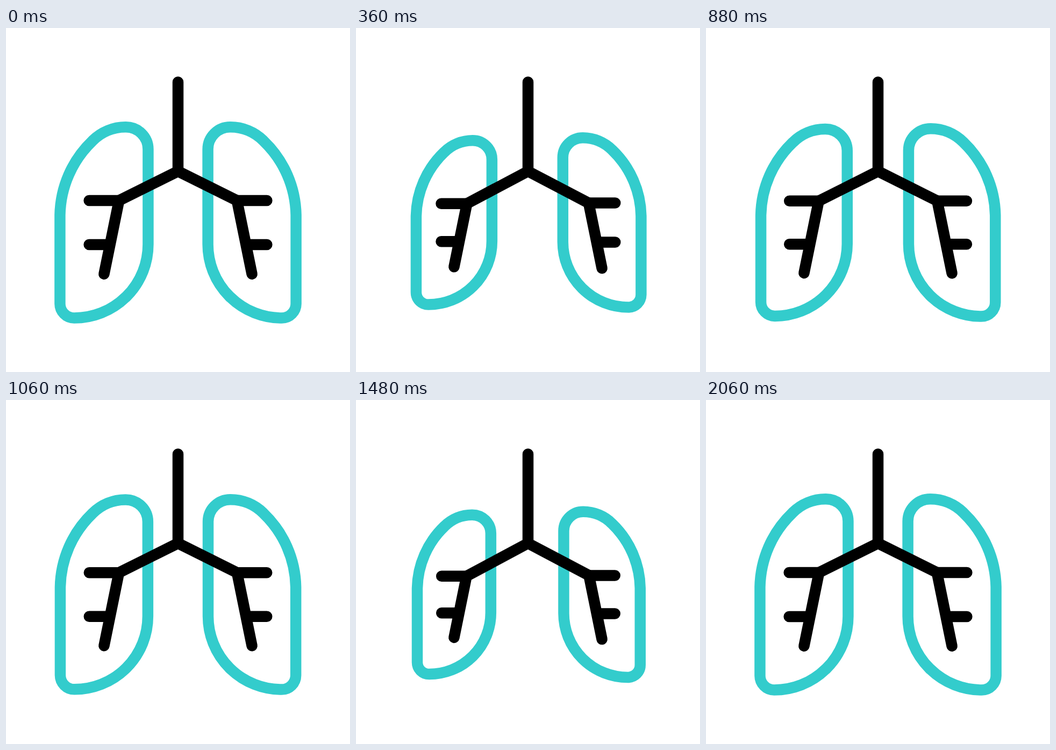
An HTML page that plays this animation: 640x640 px, repeating every 2400 ms.

```html
<!DOCTYPE html>
<html lang="en">
<head>
<meta charset="utf-8">
<title>Breathing lungs</title>
<style>
  html, body { margin: 0; width: 100%; height: 100%; overflow: hidden; background: #fff; }
  svg { display: block; width: 100%; height: 100%; }
  path { fill: none; stroke-linecap: round; stroke-linejoin: round; }
  .lung { stroke: #33cccc; }
  .airway { stroke: #000; }
</style>
</head>
<body>
<svg viewBox="0 0 640 640">
  <defs>
    <path id="lung" d="M100.4 348V513A26.5 26.5 0 0 0 127 539.5A137.4 137 0 0 0 264.4 402.5V225.5A41.5 41.2 0 0 0 222.5 184.3A87 87 0 0 0 161 209.8A196 196 0 0 0 100.4 348Z"/>
    <path id="twigs" d="M154.6 321H210.3L182.4 457.8M154.6 403H193.5"/>
  </defs>
  <g class="lung"><use href="#lung"/></g>
  <g class="lung"><use href="#lung"/></g>
  <g class="airway"><use href="#twigs"/></g>
  <g class="airway"><use href="#twigs"/></g>
  <path class="airway" id="trachea" stroke-width="20.5"/>
</svg>
<script>
  const LOOP = 2400, TICK = 20, WEIGHT = 20.5;
  const CX = 182.4, CY = 361.9;
  const FORK = { x: 210.3, y: 321 };
  // [time in ms, how much the left lung shrinks]
  const KEYS = [[0, 0], [461, 0.16], [1000, 0], [1508, 0.167], [2062, 0], [LOOP, 0]];
  const RIGHT_SHARE = 0.8;

  const [lungL, lungR] = document.querySelectorAll('g.lung');
  const [twigsL, twigsR] = document.querySelectorAll('g.airway');
  const trachea = document.getElementById('trachea');

  const ease = u => u * u * (3 - 2 * u);

  function shrinkAt(t) {
    const i = KEYS.findIndex(k => k[0] > t);
    const [t0, a] = KEYS[i - 1], [t1, b] = KEYS[i];
    return a + (b - a) * ease((t - t0) / (t1 - t0));
  }

  // Scale about the lung's centre while the line weight stays constant.
  function pose(group, scale, mirrored) {
    const flip = mirrored ? 'translate(640 0) scale(-1 1) ' : '';
    group.setAttribute('transform',
      `${flip}translate(${CX} ${CY}) scale(${scale}) translate(${-CX} ${-CY})`);
    group.setAttribute('stroke-width', WEIGHT / scale);
  }

  const forkAt = s => ({ x: CX + (FORK.x - CX) * s, y: CY + (FORK.y - CY) * s });

  function draw(now) {
    const t = Math.floor((now % LOOP) / TICK) * TICK;
    const shrink = shrinkAt(t);
    const left = 1 - shrink, right = 1 - shrink * RIGHT_SHARE;
    pose(lungL, left, false);
    pose(twigsL, left, false);
    pose(lungR, right, true);
    pose(twigsR, right, true);
    const l = forkAt(left), r = forkAt(right);
    trachea.setAttribute('d',
      `M320 100.4V266.5M${l.x} ${l.y}L320 266.5L${640 - r.x} ${r.y}`);
  }

  let start;
  function frame(now) {
    start ??= now;
    draw(now - start);
    requestAnimationFrame(frame);
  }
  draw(0);
  requestAnimationFrame(frame);
</script>
</body>
</html>
```
